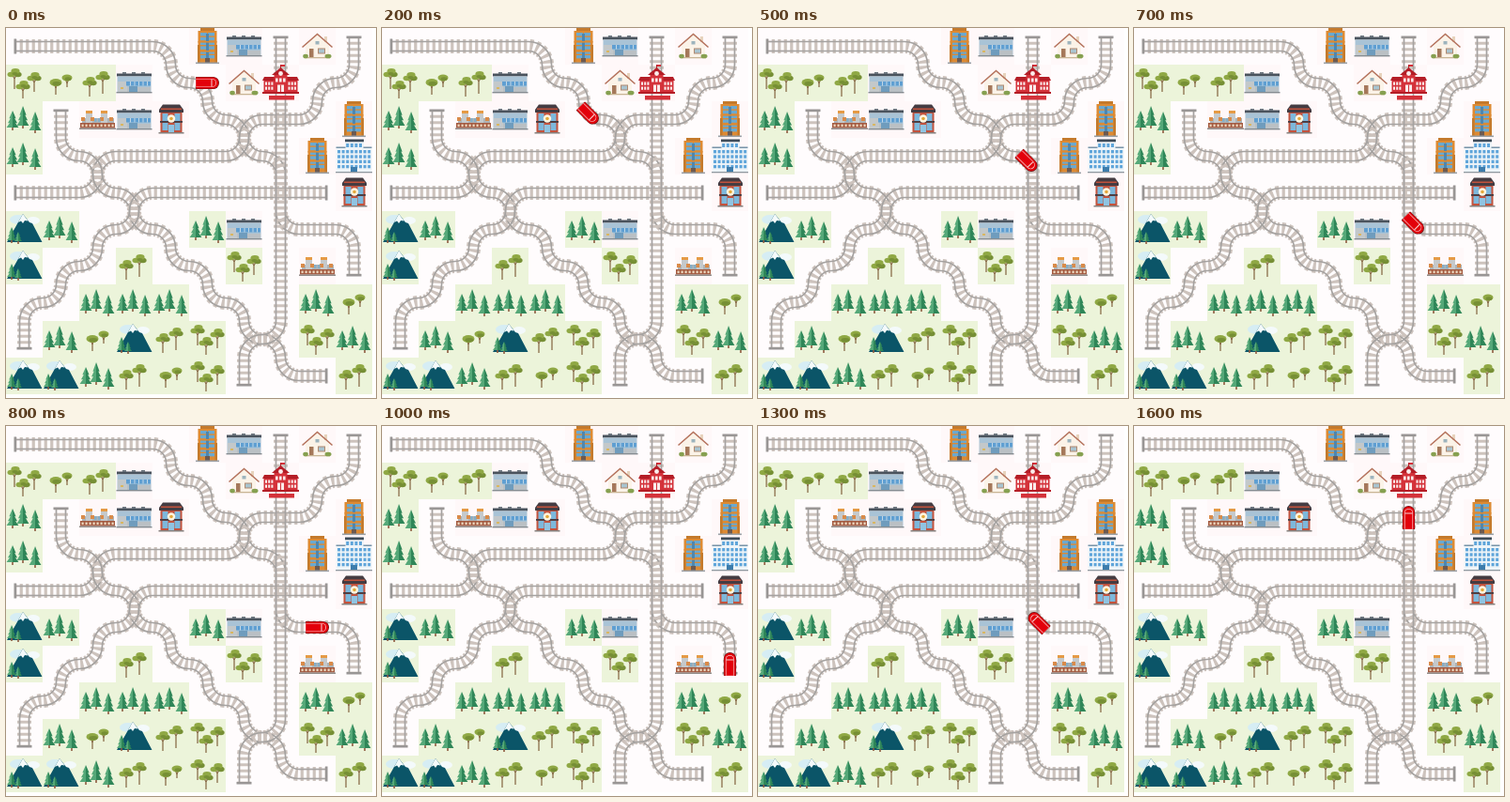
An HTML page with a canvas that plays this animation: 394 by 394 pixels, repeating every 1700 ms.

```html
<!DOCTYPE html>
<html lang="en">
<head>
<meta charset="utf-8">
<title>Railway map</title>
<style>
  html, body { margin: 0; width: 100%; height: 100%; overflow: hidden; background: #fff; }
  canvas { position: absolute; left: 0; top: 0; }
</style>
</head>
<body>
<canvas id="map" width="394" height="394"></canvas>
<canvas id="train" width="394" height="394"></canvas>
<script>
const TILE = 39, HALF = TILE / 2, STEP_MS = 100;
const g = document.getElementById('map').getContext('2d');
const t = document.getElementById('train').getContext('2d');
const HEADING = { E: [1, 0, 0], S: [0, 1, 1], W: [-1, 0, 2], N: [0, -1, 3] };

// ---- drawing helpers ----
function rect(color, x, y, w, h) {
  g.fillStyle = color;
  g.fillRect(x, y, w, h);
}
function poly(color, ...points) {
  g.fillStyle = color;
  g.beginPath();
  for (let i = 0; i < points.length; i += 2) g.lineTo(points[i], points[i + 1]);
  g.fill();
}
function line(color, width, ...points) {
  g.strokeStyle = color;
  g.lineWidth = width;
  g.beginPath();
  for (let i = 0; i < points.length; i += 2) g.lineTo(points[i], points[i + 1]);
  g.stroke();
}
function oval(color, x, y, rx, ry = rx) {
  g.fillStyle = color;
  g.beginPath();
  g.ellipse(x, y, rx, ry, 0, 0, 7);
  g.fill();
}
function grid(color, x, y, cols, rows, dx, dy, w, h) {
  for (let i = 0; i < cols * rows; i++)
    rect(color, x + (i % cols) * dx, y + Math.floor(i / cols) * dy, w, h);
}
function inTile(ctx, col, row, draw, centred) {
  ctx.save();
  const shift = centred ? HALF : 0;
  ctx.translate(col * TILE + shift, row * TILE + shift);
  draw();
  ctx.restore();
}
const turnOf = (from, to) => [0, 1, 0, -1][(HEADING[to][2] - HEADING[from][2] + 4) % 4];

// ---- scenery ----
function trunk(x, y, base, spread) {
  line('#8a6e4a', 1.3, x, y, x, base);
  line('#8a6e4a', 1, x - spread, y, x, y + 6, x + spread, y);
}
function roundTree(x, y, rx, base) {
  trunk(x, y, base, 2.5);
  oval('#8fa844', x, y, rx, rx * .62);
  oval('#768f35', x + 1, y + 1.2, rx - 2, rx * .35);
}
function bushyTree(x, y, base) {
  trunk(x, y, base, 4);
  oval('#8fa844', x - 3.5, y + 1.5, 4, 2.8);
  oval('#768f35', x + 3.8, y + 1.5, 3.8, 2.8);
  oval('#8fa844', x + 1, y - 2, 4.6, 3);
  oval('#768f35', x + .5, y + .5, 3, 1.6);
}
function conifer(x, top, base, w) {
  rect('#8d5b40', x - .8, base - 4, 1.6, 4);
  const h = base - 3 - top;
  for (let i = 2; i >= 0; i--) {
    const peak = top + i * h * .24, foot = top + h * (.46 + i * .27), half = w * (.55 + i * .22);
    poly('#55a878', x, peak, x - half, foot, x, foot);
    poly('#2f8658', x, peak, x, foot, x + half, foot);
  }
}
function house() {
  poly('#fbf3e8', 19.5, 7, 32, 19, 32, 32, 7, 32, 7, 19);
  rect('#e7d3bd', 27, 9, 3, 6);
  line('#b5735c', 1.6, 3.5, 20.5, 19.5, 6.5, 35.5, 20.5);
  rect('#9db4bd', 17.5, 14, 4, 3.5);
  rect('#a5785a', 11, 22, 4.5, 10);
  rect('#b08a70', 20, 21.5, 8, 6);
  rect('#a9c4cf', 21, 22.5, 6, 4);
  rect('#c9b594', 6, 31, 27, 1.3);
  oval('#86a050', 7, 30, 2.8, 2.3);
  oval('#86a050', 31, 30, 3.5, 2.3);
}
function tower() {
  rect('#c47a2c', 12, 0, 15, 4);
  rect('#dd8a33', 9.5, 3, 20, 34);
  grid('#6ba9d0', 12, 5, 2, 6, 8, 4.8, 7, 3.4);
  rect('#4f86ad', 18, 6, 3, 26);
  grid('#dd8a33', 9.5, 14, 1, 2, 0, 10, 20, 1.6);
  rect('#c47a2c', 9, 18, 2.5, 19);
  rect('#c47a2c', 27.5, 18, 2.5, 19);
  rect('#6d5a50', 17, 32, 5, 5);
  rect('#9aa0a5', 7, 36.5, 25, 1.6);
}
function depot() {
  rect('#4a535d', 1, 9.5, 37, 3);
  grid('#6b747d', 7, 8, 3, 1, 10, 0, 4, 2);
  rect('#a9c3d6', 1.5, 12.5, 36, 17);
  rect('#c3c8ca', 2, 18, 10, 11);
  rect('#bac0c4', 12, 24, 25, 5.5);
  rect('#5f9fd2', 11, 18, 26, 4.5);
  grid('#c3d8e6', 15, 18, 5, 1, 4.5, 0, 1, 4.5);
  rect('#6f9cbd', 14, 23, 9, 6);
  rect('#d9b660', 5, 24, 3, 2);
  rect('#858c91', .5, 29, 38, 1.4);
}
function station() {
  poly('#b41d26', 2, 13, 37, 13, 39, 17, 0, 17);
  rect('#d4323a', 1.5, 17, 36, 12);
  rect('#d4323a', 12.5, 9, 14, 20);
  poly('#b41d26', 19.5, 3, 10, 11, 29, 11);
  line('#b41d26', 1, 19.5, 0, 19.5, 6);
  rect('#d4323a', 20, 0, 4, 2);
  oval('#fbeceb', 19.5, 9.5, 2.4);
  grid('#fbeceb', 3, 18.5, 3, 2, 3.2, 5, 2, 3.3);
  grid('#fbeceb', 27.5, 18.5, 3, 2, 3.2, 5, 2, 3.3);
  grid('#fbeceb', 14, 14.5, 3, 1, 4, 0, 2.6, 4);
  rect('#fbeceb', 16, 21.5, 7, 7.5);
  rect('#d4323a', 19, 21.5, 1, 7.5);
  rect('#b41d26', 0, 29, 39, 2);
  rect('#d4323a', 7, 33, 27, 4.5);
}
function factory() {
  rect('#aeb3b6', 3, 18, 34, 8);
  grid('#c5c9cb', 7, 11, 2, 1, 16, 0, 7, 14);
  grid('#e59a45', 7, 10, 2, 1, 16, 0, 7, 3);
  grid('#d98b4a', 2, 17, 4, 1, 10, 0, 4, 4);
  grid('#86aec6', 16, 18, 2, 1, 4, 0, 2.5, 4);
  rect('#a3593f', 1, 23, 37, 5.5);
  grid('#ecd6bd', 2.5, 24.5, 9, 1, 4, 0, 2.2, 2.6);
  rect('#85807d', 0, 28.5, 39, 1.4);
}
function shop() {
  rect('#c2523d', 8.5, 9, 23, 24);
  poly('#453c42', 11, 3.5, 29, 3.5, 33, 9, 33, 12, 7, 12, 7, 9);
  rect('#c2523d', 9, 7.5, 22, 1.5);
  grid('#7db8dc', 10.5, 13, 2, 2, 13, 10, 6, 8);
  rect('#90c4e2', 17, 25, 6, 8);
  rect('#453c42', 8, 21, 24, 1.8);
  oval('#fff5e0', 20, 18.5, 4.2);
  oval('#e3a83b', 20, 18.5, 1.8);
  rect('#85807d', 6.5, 33, 27, 1.5);
}
function office() {
  rect('#3f4c59', 10, 1.5, 20, 3);
  rect('#eef4f8', 10, 4.5, 20, 32);
  rect('#eef4f8', .5, 10, 38, 26);
  rect('#7793a8', .5, 9.5, 10, 1.5);
  rect('#7793a8', 29.5, 9.5, 9, 1.5);
  grid('#5fa5da', 2, 13, 8, 4, 4.6, 5.3, 3, 3.4);
  grid('#5fa5da', 11.2, 6, 4, 1, 4.6, 0, 3, 4);
  rect('#3d7cab', 16, 31, 7, 5.5);
  rect('#8f989f', 0, 36, 39, 1.3);
}
function mountain() {
  oval('#d6edf4', 13, 9, 9, 5);
  oval('#f4fafb', 29, 10, 7, 4);
  poly('#0b5568', 18, 3, 25, 12, 28, 13, 38.5, 33, 1, 33);
  poly('#f4fafb', 18, 3, 13, 12, 16, 10.5, 18, 13, 20, 10, 23.5, 10.5);
  conifer(13, 22, 35, 4);
  conifer(6, 17, 34, 5);
}
const SCENERY = {
  a() { bushyTree(9, 9, 26); bushyTree(30, 13, 29); bushyTree(18, 22, 36); },
  b() { roundTree(14, 19, 6.5, 32); roundTree(26, 14, 5.5, 24); },
  c() { bushyTree(11, 18, 34); bushyTree(25, 12, 31); },
  f() { conifer(18, 5, 29, 6.5); conifer(7, 10, 31, 6.5); conifer(31, 11, 34, 6.5); },
  m: mountain, d: depot, t: tower, h: house, s: station, k: factory, p: shop, o: office
};
const TILES = [
  '.....td.h.',
  'abcd..hs..',
  'f.kdp....t',
  'f.......to',
  '.........p',
  'mf...fd...',
  'm..c..a.k.',
  '..fff...fb',
  '.fbmca..af',
  'mmfcba...c'
];

// ---- rails: start column, start row, headings ----
const ROUTES = [
  [0, 0, 'EEEESESESESSEES'],
  [9, 0, 'SWSWWSWWWWSWW'],
  [1, 2, 'SESESESESESESE'],
  [8, 4, 'WWWWWSWSWSWS'],
  [7, 0, 'SSSSSSSSWS']
];
function strokeRail(turn, offset, start) {
  g.beginPath();
  if (turn) g.arc(-HALF, HALF, HALF + offset, -Math.PI / 2, 0);
  else { g.moveTo(start, offset); g.lineTo(HALF, offset); }
  g.stroke();
}
function rail(from, to, isEnd) {
  const turn = turnOf(from, to), start = isEnd ? -10 : -HALF;
  const pitch = turn ? HALF * Math.PI / 10 : TILE / 6;
  g.rotate(HEADING[from][2] * Math.PI / 2);
  if (turn < 0) g.scale(1, -1);
  g.strokeStyle = '#cdc3bd';
  g.lineWidth = 15;
  g.setLineDash([3.2, pitch - 3.2]);
  g.lineDashOffset = 1.6 - pitch / 2 + start + HALF;
  strokeRail(turn, 0, start);
  g.setLineDash([]);
  g.strokeStyle = '#a5a2a0';
  g.lineWidth = 1.7;
  strokeRail(turn, -5, start);
  strokeRail(turn, 5, start);
  if (isEnd) rect('#999695', -11, -8, 2.6, 16);
}
function drawRoute([col, row, moves]) {
  const last = moves.length;
  for (let i = 0; i <= last; i++) {
    const reverse = { E: 'W', W: 'E', N: 'S', S: 'N' }[moves[last - 1]];
    const to = i < last ? moves[i] : reverse;
    const isEnd = i === 0 || i === last;
    inTile(g, col, row, () => rail(isEnd ? to : moves[i - 1], to, isEnd), true);
    col += HEADING[to][0];
    row += HEADING[to][1];
  }
}
function drawMap() {
  rect('#fffcfd', 0, 0, 390, 390);
  const each = visit => TILES.forEach((keys, row) =>
    [...keys].forEach((key, col) => key !== '.' && visit(key, col, row)));
  each((key, col, row) =>
    rect('abcfm'.includes(key) ? '#ecf4da' : '#fff8f9', col * TILE, row * TILE, TILE, TILE));
  ROUTES.forEach(drawRoute);
  each((key, col, row) => inTile(g, col, row, SCENERY[key]));
}

// ---- train: one tile per step, reversing at the dead end ----
const HEADINGS = 'EESESESSEESNWWNNNN';
const STEPS = HEADINGS.length - 1;

function trainBody() {
  const hull = (back, front, half, color) => {
    t.fillStyle = color;
    t.beginPath();
    t.roundRect(back, -half, front - back, half * 2, [.5, half, half, .5]);
    t.fill();
  };
  hull(-12.5, 12.5, 6.6, '#6d1014');
  hull(-12.2, 11.8, 6.1, '#e3000b');
  hull(-12.2, 9.5, 4.6, '#f6c9c9');
  hull(-12.2, 8.7, 3.9, '#e3000b');
  t.fillStyle = '#f6dada';
  t.fillRect(4, -4, 1, 8);
}
function drawTrain(step) {
  let col = 5, row = 1;
  for (let i = 2; i <= step; i++) {
    col += HEADING[HEADINGS[i]][0];
    row += HEADING[HEADINGS[i]][1];
  }
  const to = HEADINGS[step + 1];
  let from = HEADINGS[step];
  if (from + to === 'SN') from = to;
  const turn = turnOf(from, to);
  t.clearRect(0, 0, 394, 394);
  inTile(t, col, row, () => {
    t.rotate(HEADING[from][2] * Math.PI / 2);
    if (turn) {
      t.scale(1, turn);
      t.translate(-5.7, 5.7);
      t.rotate(Math.PI / 4);
    }
    trainBody();
  }, true);
}

drawMap();
const began = performance.now();
let shown = -1;
function tick() {
  const step = Math.floor((performance.now() - began) / STEP_MS) % STEPS;
  if (step !== shown) drawTrain(shown = step);
  requestAnimationFrame(tick);
}
tick();
</script>
</body>
</html>
```
